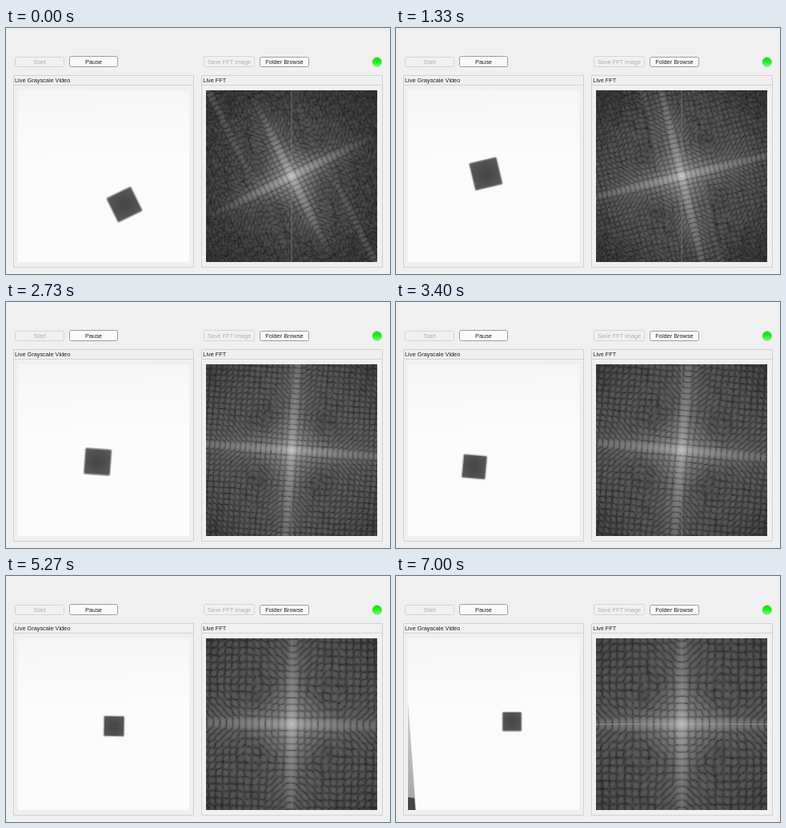
Write an HTML page with a canvas that moves like this. It is 480 px wide and 308 px high and loops after 7.07 s.

```html
<!DOCTYPE html>
<html lang="en">
<head>
<meta charset="utf-8">
<title>Live FFT</title>
<style>
  html, body { margin: 0; width: 100%; height: 100%; overflow: hidden; background: #f0f0f0; }
  svg, canvas { position: absolute; left: 0; top: 0; }
  canvas { left: 250px; top: 78px; width: 214px; height: 215px; }
  text { font: 7.35px "Liberation Sans", Arial, sans-serif; fill: #1c1c1c; }
  .panel { fill: none; stroke: #d2d2d2; }
  .button rect { fill: #fafafa; stroke: #9c9c9c; }
  .button text { text-anchor: middle; }
  .disabled rect { fill: #f1f1f1; stroke: #d4d4d4; }
  .disabled text { fill: #adadad; }
</style>
</head>
<body>
<svg width="480" height="308" viewBox="0 0 480 308">
  <defs>
    <linearGradient id="paper" x1="0" y1="0" x2=".05" y2="1">
      <stop offset="0" stop-color="#f5f5f5"/>
      <stop offset=".25" stop-color="#f9f9f9"/>
      <stop offset=".4" stop-color="#fbfbfb"/>
    </linearGradient>
    <linearGradient id="shade" x1="0" y1="0" x2="0" y2="1">
      <stop offset="0" stop-color="#d5d5d5"/>
      <stop offset="1" stop-color="#a2a2a2"/>
    </linearGradient>
    <linearGradient id="green" x1="0" y1="0" x2="0" y2="1">
      <stop offset="0" stop-color="#0ae00a"/>
      <stop offset=".5" stop-color="#18f818"/>
      <stop offset="1" stop-color="#7dff7d"/>
    </linearGradient>
    <radialGradient id="ink" r=".7">
      <stop offset=".2" stop-color="#484848"/>
      <stop offset="1" stop-color="#5c5c5c"/>
    </radialGradient>
    <filter id="soft"><feGaussianBlur stdDeviation=".65"/></filter>
    <filter id="blockSoft" x="-.2" y="-.2" width="1.4" height="1.4">
      <feGaussianBlur stdDeviation=".7"/>
    </filter>
    <clipPath id="view"><rect x="15" y="78" width="214" height="215"/></clipPath>
  </defs>

  <g class="panel">
    <path d="M9.5 59.5H234.5V299.5H9.5ZM9.5 71.5H234.5"/>
    <path d="M244.5 59.5H470.5V299.5H244.5ZM244.5 71.5H470.5"/>
  </g>
  <text x="11" y="68">Live Grayscale Video</text>
  <text x="246.3" y="68">Live FFT</text>

  <g class="button disabled"><rect x="11.5" y="36.5" width="61" height="12" rx="2"/><text x="42" y="45">Start</text></g>
  <g class="button"><rect x="79.5" y="35.5" width="60" height="13" rx="2"/><text x="109.5" y="44.5">Pause</text></g>
  <g class="button disabled"><rect x="247.5" y="35.5" width="63" height="13" rx="2"/><text x="279" y="44.5">Save FFT image</text></g>
  <g class="button"><rect x="317.5" y="36.5" width="61" height="12" rx="2"/><text x="348" y="45.3">Folder Browse</text></g>
  <circle cx="463.8" cy="42.5" r="5.8" fill="url(#green)" stroke="#8fb88f" stroke-width=".7"/>

  <g clip-path="url(#view)">
    <rect x="15" y="78" width="214" height="215" fill="url(#paper)"/>
    <g id="wedge" filter="url(#soft)">
      <path d="M10 150H14.5L25 296H10Z" fill="url(#shade)"/>
      <path d="M10 276.5L23 278L24.5 296H10Z" fill="#444"/>
    </g>
    <rect id="block" rx="2" fill="url(#ink)" stroke="#aaa" stroke-width="1.3" filter="url(#blockSoft)"/>
  </g>
</svg>
<canvas id="spectrum" width="215" height="215"></canvas>

<script>
const LOOP = 7070, SIZE = 215, HALF = 107, PERIOD = 214;

// time, centre x, centre y, side, angle in degrees
const poses = [
  [0, 148, 221, 34.5, -26],
  [800, 130, 202, 35, -20],
  [1330, 112.3, 182.5, 35.5, -13.5],
  [1930, 149, 190.7, 37, 2],
  [3070, 100, 204, 31.5, 5],
  [3400, 98, 206.3, 30, 5],
  [3800, 93, 200, 29, 5],
  [4400, 112.8, 181.3, 27, 3],
  [5270, 135, 188, 26, 1],
  [7000, 145, 182.3, 24.5, 0]
];

// Camera updates arrive in bursts: first tick, last tick, count (15 ticks a second)
const bursts = [
  [2, 12, 8], [14, 24, 9], [25, 35, 8], [36, 46, 8], [48, 57, 7],
  [59, 69, 9], [71, 81, 8], [83, 93, 9], [94, 104, 8], [105, 105, 1]
];
const updates = [0];
for (const [first, last, count] of bursts) {
  for (let k = 0; k < count; k++) {
    const tick = first + Math.floor((last - first) * k / Math.max(1, count - 1));
    updates.push(Math.round(tick * 20 / 3) * 10);
  }
}

function randomizer(seed) {
  return () => (seed = (seed * 1664525 + 1013904223) >>> 0) / 4294967296;
}

// Small blemishes around the block that give the spectrum its speckle
const rand = randomizer(11);
const blemishes = Array.from({ length: 11 }, () => ({
  x: (rand() - .5) * 1.8,
  y: (rand() - .5) * 1.8,
  power: 16 + 28 * rand()
}));

function poseAt(t) {
  let i = 0;
  while (i < poses.length - 2 && t >= poses[i + 1][0]) i++;
  const a = poses[i], b = poses[i + 1];
  const p = (t - a[0]) / (b[0] - a[0]);
  const [x, y, side, angle] = a.slice(1).map((v, k) => v + (b[k + 1] - v) * p);
  return { x, y, side, angle };
}

const sinc = x => Math.abs(x) < 1e-6 ? 1 : Math.sin(Math.PI * x) / (Math.PI * x);

const context = document.getElementById("spectrum").getContext("2d");
const picture = context.createImageData(SIZE, SIZE);

function drawSpectrum({ side, angle }, wedge, seed) {
  const noise = randomizer(seed * 7919 + 5);
  const c = Math.cos(angle * Math.PI / 180) * side / PERIOD;
  const s = Math.sin(angle * Math.PI / 180) * side / PERIOD;
  const peak = 175 * side * side;
  const corners = 750;
  const spread = 11000 / (1 + (angle / 15) ** 2);
  const square = (u, v) => peak * sinc(u * c + v * s) * sinc(v * c - u * s);
  const echo = (u, v) => square(u, v) * .11 * Math.min(1, (v / HALF) ** 2);

  const plot = (u, v, gray) => {
    const i = ((v + HALF) * SIZE + u + HALF) * 4;
    picture.data[i] = picture.data[i + 1] = picture.data[i + 2] = gray;
    picture.data[i + 3] = 255;
  };

  // The spectrum of a real image is point-symmetric, so half is enough
  for (let v = -HALF; v <= 0; v++) {
    for (let u = -HALF; u <= HALF; u++) {
      const r2 = u * u + v * v;
      const blur = Math.exp(-r2 / spread);
      const haze = Math.exp(-r2 / 13000);
      const a = 2 * Math.PI * (u * c + v * s), b = 2 * Math.PI * (v * c - u * s);
      // Rounded corners bend the grid of dark lines
      const rounded = square(u, v) - corners * Math.cos(a * .46) * Math.cos(b * .46);
      let re = rounded * blur + echo(u, v + HALF) + echo(u, v - HALF);
      let im = 0;
      for (const spot of blemishes) {
        const phase = a * spot.x + b * spot.y;
        re += spot.power * haze * Math.cos(phase);
        im += spot.power * haze * Math.sin(phase);
      }
      re += (noise() - .5) * 50;
      im += (noise() - .5) * 50;

      let power = Math.hypot(re, im);
      if (u === 0) power += 1000 + 30000 / (1 - v);
      if (v === 0) power += wedge * (5000 + 100000 / (1 + Math.abs(u)));
      if (r2 === 0) power += 4e6;
      const gray = 15.7 * Math.log(1 + power);
      plot(u, v, gray);
      plot(-u, -v, gray);
    }
  }
  context.putImageData(picture, 0, 0);
}

const block = document.getElementById("block");
const wedgeShape = document.getElementById("wedge");
let shown = -1;

function placeBlock({ x, y, side, angle }) {
  const edge = side - .6;
  for (const name of ["width", "height"]) block.setAttribute(name, edge);
  for (const name of ["x", "y"]) block.setAttribute(name, -edge / 2);
  block.setAttribute("transform", `translate(${x} ${y}) rotate(${angle})`);
}

function frame() {
  const t = performance.now() % LOOP;
  let index = updates.length - 1;
  while (updates[index] > t) index--;
  if (index !== shown) {
    shown = index;
    const time = updates[index];
    const pose = poseAt(time);
    const wedge = Math.max(0, (time - 6700) / 300);
    placeBlock(pose);
    wedgeShape.setAttribute("transform", `translate(${(wedge - 1) * 12} 0)`);
    wedgeShape.style.display = wedge ? "" : "none";
    drawSpectrum(pose, wedge, index);
  }
  requestAnimationFrame(frame);
}
frame();
</script>
</body>
</html>
```
